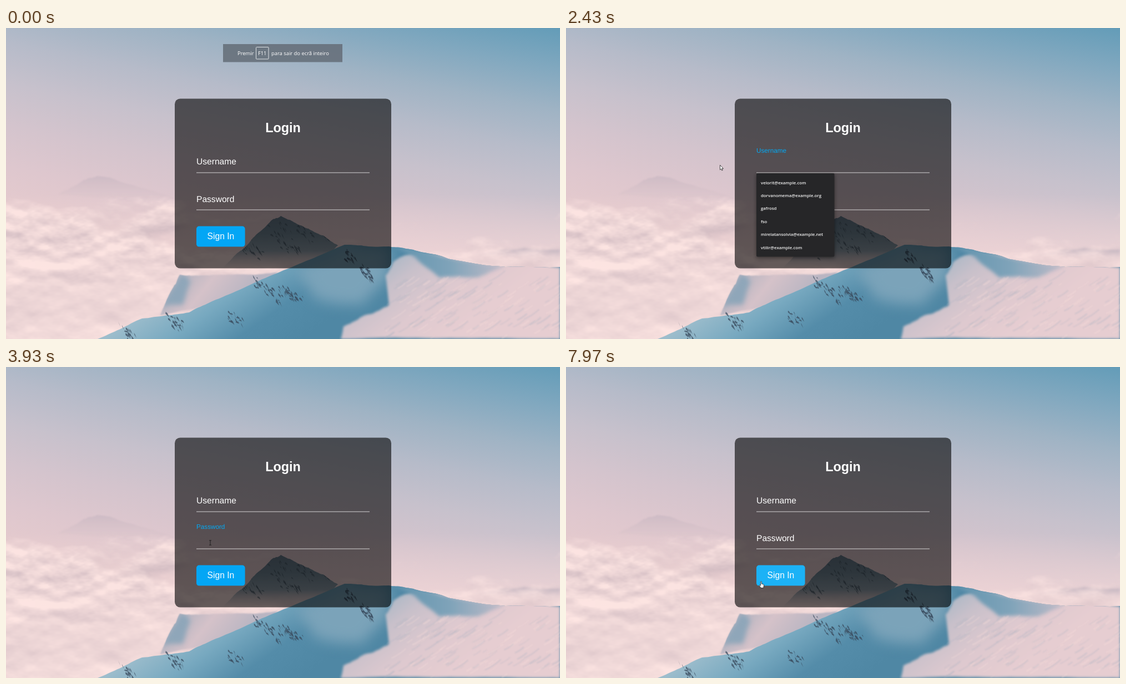
Write an HTML page with a canvas that moves like this. It is 998 px wide and 561 px high and loops after 8000 ms.

```html
<!DOCTYPE html>
<html lang="en">
<head>
<meta charset="utf-8">
<title>Login</title>
<style>
  html, body { margin: 0; width: 100%; height: 100%; overflow: hidden; background: #dcc8ce; }
  canvas, svg { position: absolute; left: 0; top: 0; width: 998px; height: 561px; }
  text { font-family: "Liberation Sans", Arial, sans-serif; font-size: 15.6px; fill: #fff; white-space: pre; }
  #notice text { font-family: "Open Sans", sans-serif; font-size: 9.4px; }
  #list text { font-family: "Open Sans", sans-serif; font-size: 7.8px; font-weight: 600; fill: #f2f2f2; }
  .label { text-rendering: geometricPrecision; }
</style>
</head>
<body>
<canvas id="scene" width="998" height="561"></canvas>
<svg viewBox="0 0 998 561">
  <g id="notice">
    <rect x="391" y="29" width="215" height="32.5" fill="#69737d" opacity=".93"/>
    <rect x="450.5" y="34.5" width="22.5" height="21.5" rx="1" fill="none" stroke="#dfe3e6"/>
    <text x="417" y="48.6">Premir</text>
    <text x="461.7" y="48.6" text-anchor="middle">F11</text>
    <text x="478" y="48.6">para sair do ecrã inteiro</text>
  </g>
  <rect x="304" y="127.5" width="390" height="306" rx="9.75" fill="#000" fill-opacity=".6"/>
  <text x="499" y="187.6" text-anchor="middle" style="font-size:23.4px;font-weight:bold">Login</text>
  <path d="M343 261h312M343 328h312" stroke="#fff" stroke-opacity=".75"/>
  <text id="user" class="label" x="343">Username</text>
  <text id="pass" class="label" x="343">Password</text>
  <g id="dots" fill="#fff"></g>
  <rect id="button" x="343" y="357.6" width="87.6" height="37" rx="4.9"/>
  <text x="362.6" y="381">Sign In</text>
  <g id="list">
    <rect x="343" y="262" width="140.5" height="150.5" rx="2" fill="#262628"
          style="filter:drop-shadow(0 2px 3px rgba(0,0,0,.45))"/>
  </g>
  <rect id="caret" width="1" height="17" fill="#fff"/>
  <g id="cursor" stroke-linejoin="round">
    <path id="arrow" d="M0 0V8.6L2 6.9 3.3 9.8 4.7 9.2 3.4 6.4H6Z" fill="#fff" stroke="#222" stroke-width=".8"/>
    <path id="beam" d="M-2-4.2H2M0-4V4M-2 4.2H2" fill="none" stroke="#1c1a1b" stroke-width=".9"/>
    <path id="hand" d="M-.9.3Q0-.7.9.3V4.2L4.4 5Q5.2 5.4 5 7L4.2 11.5H-.4L-3.2 7.4Q-3.2 6-2 6.4L-.9 7.4Z" fill="#fff" stroke="#222" stroke-width=".8"/>
  </g>
</svg>
<script>
const $ = id => document.getElementById(id);
const clamp = (v, lo = 0, hi = 1) => Math.min(hi, Math.max(lo, v));
const mix = (a, b, k) => a + (b - a) * k;
const smooth = k => k * k * (3 - 2 * k);

/* ---------- landscape, painted once ---------- */
const c = $('scene').getContext('2d');
let seed = 7;
const random = () => (seed = seed * 16807 % 2147483647) / 2147483647;
const jitter = size => (random() - .5) * size;

// evenly spaced colours along a line
function gradient(x0, y0, x1, y1, ...colors) {
  const g = c.createLinearGradient(x0, y0, x1, y1);
  colors.forEach((color, i) => g.addColorStop(i / (colors.length - 1), color));
  return g;
}

// polygon through key points, its edges broken up by midpoint displacement
function crag(outline, rough) {
  let points = outline.split(' ').map(p => p.split(',').map(Number));
  for (; rough > .4; rough /= 2)
    points = points.flatMap((p, i) => {
      const q = points[(i + 1) % points.length];
      return [p, [(p[0] + q[0]) / 2, (p[1] + q[1]) / 2 + jitter(rough)]];
    });
  return new Path2D('M' + points.join('L') + 'Z');
}
function paint(path, fill, blur = 0) {
  c.filter = blur ? `blur(${blur}px)` : 'none';
  c.fillStyle = fill;
  c.fill(path);
}
function inside(path, drawContent) {
  c.save();
  c.clip(path);
  drawContent();
  c.restore();
}
// small slanted slabs of bare rock around a point
function rocks(x, y, spread, count, color) {
  for (let i = 0; i < count; i++) {
    const k = jitter(2), px = x + k * spread + jitter(8), py = y + k * spread * .7 + jitter(18);
    const wide = 1 + 2.5 * random(), tall = 3 + 9 * random();
    paint(new Path2D(`M${px} ${py}l${wide} ${tall * .3} ${tall * .3} ${tall * .7} ${-wide * 2} ${-tall * .6}z`), color, .5);
  }
}

const lattice = Float32Array.from({ length: 4096 }, random);
function noise(x, y) {
  const i = Math.floor(x), j = Math.floor(y), u = smooth(x - i), v = smooth(y - j);
  const at = (a, b) => lattice[(a & 63) + (b & 63) * 64];
  return mix(mix(at(i, j), at(i + 1, j), u), mix(at(i, j + 1), at(i + 1, j + 1), u), v);
}
function fractal(x, y) {
  let sum = 0;
  for (let size = .5, f = 1; f < 32; f *= 2, size /= 2) sum += size * noise(x * f, y * f);
  return sum;
}

function paintClouds() {
  const top = 255, image = c.getImageData(0, top, 998, 561 - top), data = image.data;
  const shade = [205, 184, 191], light = [254, 230, 227];
  for (let i = 0; i < data.length; i += 4) {
    const x = i / 4 % 998, y = top + Math.floor(i / 4 / 998);
    const n = fractal(x / 95, y / 48);
    const edge = mix(285, 385, smooth(clamp(x / 650)));
    const cover = clamp((y - edge) / 45 + 4 * (n - .48)) * mix(.9, .6, x / 998);
    const contrast = mix(3.5, 1.5, clamp((y - 400) / 80));
    const lit = clamp(.66 + contrast * (n - fractal((x + 3) / 95, (y - 11) / 48)));
    for (let k = 0; k < 3; k++) data[i + k] = mix(data[i + k], mix(shade[k], light[k], lit), cover);
  }
  c.putImageData(image, 0, top);
}

function paintScene() {
  c.fillStyle = gradient(998, 0, 883, 577, '#639cb8', '#81a8bf', '#9fb3c4', '#b6bbc9', '#c7c1cc', '#d4c4cd', '#dec7ce', '#e5cacd', '#e7cccf');
  c.fillRect(0, 0, 998, 561);
  c.fillStyle = gradient(0, 300, 0, 500, '#f7dcda00', '#f7dcda');
  c.fillRect(0, 300, 998, 261);

  paint(crag('95,300 130,281 165,267 205,277 300,306 300,318', 6), gradient(0, 265, 0, 316, '#cdbbc5', '#dcc7cc00'), 1);
  paint(crag('850,408 935,397 998,399 998,425', 5), gradient(0, 395, 0, 425, '#b9aebb', '#d8c6cc00'), 2);
  paintClouds();

  const peak = crag('390,433 436,390 478,347 495,339 545,362 598,392 560,433', 7);
  paint(peak, gradient(0, 340, 0, 433, '#66798a', '#718695', '#92a0ac', '#c2b4bc00'), .6);
  inside(peak, () => {
    for (let i = 0; i < 12; i++)
      rocks(mix(430, 575, random()), mix(345, 400, random()), 14, 7, '#42515f90');
  });

  const spur = crag('278,518 300,470 313,445 380,445 490,440 430,490', 6);
  paint(spur, gradient(300, 440, 400, 520, '#a9afbd', '#d5c2c9', '#b9b5c2'), 1);
  inside(spur, () => paint(crag('280,505 315,444 332,456 318,500', 8), '#8fa6b9', 4));

  const ridge = crag('165,561 245,524 330,513 395,483 500,437 610,391 690,394 740,402 800,417 900,431 998,431 998,561', 4);
  paint(ridge, gradient(360, 430, 480, 600, '#9dbdcc', '#78a9c0', '#548ca9', '#4f87a4'), .5);
  inside(ridge, () => {
    paint(crag('520,435 610,391 690,398 690,450 640,500 560,490', 8), '#7ba3b9', 12);

    // sunlit slope, with the shaded band under its crest
    paint(crag('603,561 608,538 650,517 690,500 684,447 700,420 735,407 998,432 998,561', 8),
      gradient(670, 400, 790, 561, '#9db3c3', '#c8c0ca', '#dec9cf', '#e6cdd1'), 2);
    paint(crag('690,393 740,400 800,415 900,429 850,450 780,450 735,412', 4),
      gradient(690, 0, 910, 0, '#5f92ad', '#7fa3b9', '#cabfca'), 3);
    c.filter = 'blur(1px)';
    for (let i = 0; i < 150; i++) {
      const x = mix(680, 1000, random()), y = mix(455, 561, random()), len = 6 + 24 * random();
      c.strokeStyle = i % 2 ? '#f6dddb60' : '#a9b2c250';
      c.lineWidth = 1 + 2 * random();
      c.stroke(new Path2D(`M${x} ${y}q${len * .5} ${-len * .2} ${len} ${-len * .65}`));
    }
  });

  for (const [x, y, spread, count] of [
    [218, 548, 14, 18], [304, 528, 14, 24], [411, 522, 14, 18], [470, 470, 24, 34],
    [512, 478, 20, 34], [617, 412, 9, 18], [648, 438, 12, 34]])
    rocks(x, y, spread, count, '#3a4c5ec0');
}
paintScene();

/* ---------- form ---------- */
function add(parent, tag, attributes, text = '') {
  const node = document.createElementNS('http://www.w3.org/2000/svg', tag);
  for (const key in attributes) node.setAttribute(key, attributes[key]);
  node.textContent = text;
  $(parent).append(node);
}
['velorit@example.com', 'dorvanomema@example.org', 'gafrosd', 'fso', 'mirelatansolvia@example.net', 'vtilir@example.com']
  .forEach((entry, i) => add('list', 'text', { x: 351, y: 281.6 + 23.4 * i }, entry));
for (let i = 0; i < 7; i++) add('dots', 'circle', { cx: 346 + 6.35 * i, cy: 308.6, r: 2.2 });

const LOOP = 8000, USER = [1600, 2600], PASS = [3430, 6940];
const TYPE = 4100, ERASE = 5500;
const blinkStarts = [USER[0], PASS[0], TYPE, TYPE + 400, ERASE, ERASE + 70];
const stops = [
  { x: 388, y: 566, leave: 700 },
  { x: 370, y: 248, arrive: 1430, leave: 2200 },
  { x: 252, y: 247, arrive: 2530, leave: 2930 },
  { x: 368, y: 317, arrive: 3230, leave: 6030 },
  { x: 183, y: 304.5, arrive: 6170, leave: 7570 },
  { x: 351.5, y: 387, arrive: 7930 }];

// CSS "ease" timing curve
function ease(x) {
  let lo = 0, hi = 1;
  const bezier = (s, a, b) => 3 * (1 - s) ** 2 * s * a + 3 * (1 - s) * s * s * b + s ** 3;
  for (let i = 0; i < 20; i++) {
    const mid = (lo + hi) / 2;
    if (bezier(mid, .25, .25) < x) lo = mid; else hi = mid;
  }
  return bezier(lo, .1, 1);
}
const within = (t, [start, end]) => t >= start && t < end;
const show = (node, on) => node.setAttribute('visibility', on ? 'visible' : 'hidden');

function drawLabel(id, baseline, t, [focus, blur]) {
  const up = t < blur ? ease(clamp((t - focus) / 500)) : 1 - ease(clamp((t - blur) / 500));
  const label = $(id);
  label.setAttribute('y', baseline - 21.4 * up);
  label.style.fontSize = mix(15.6, 11.7, up) + 'px';
  label.style.fill = `rgb(${mix(255, 3, up)},${mix(255, 169, up)},${mix(255, 244, up)})`;
}

function drawCursor(t) {
  let { x, y } = stops[0];
  for (let i = 1; i < stops.length; i++) {
    const { leave } = stops[i - 1], k = smooth(clamp((t - leave) / (stops[i].arrive - leave)));
    x = mix(x, stops[i].x, k);
    y = mix(y, stops[i].y, k);
  }
  const over = (top, bottom, right) => x >= 343 && x <= right && y >= top && y <= bottom;
  const onButton = over(357.6, 394.6, 430.6);
  const onInput = over(222, 261, 655) || over(289, 328, 655);
  $('cursor').setAttribute('transform', `translate(${x} ${y})`);
  show($('hand'), onButton);
  show($('beam'), onInput);
  show($('arrow'), !onButton && !onInput);
  $('button').setAttribute('fill', onButton ? '#1cb2f6' : '#03a6f5');
}

function draw(t) {
  $('notice').setAttribute('opacity', clamp((530 - t) / 500));
  drawLabel('user', 246.2, t, USER);
  drawLabel('pass', 313.6, t, PASS);
  show($('list'), within(t, [1700, USER[1]]));

  const keys = (start, gap) => clamp(Math.floor((t - start) / gap) + 1, 0, 7);
  const count = keys(TYPE, 67) - keys(ERASE, 33);
  [...$('dots').children].forEach((dot, i) => show(dot, i < count));

  const onUser = within(t, USER), onPass = within(t, PASS);
  const blink = t - blinkStarts.filter(s => s <= t).pop();
  $('caret').setAttribute('x', onPass ? 343 + 6.6 * count : 343);
  $('caret').setAttribute('y', onPass ? 300.5 : 233);
  show($('caret'), (onUser || onPass) && blink % 1000 < 500);
  drawCursor(t);
}

const start = performance.now();
function frame() {
  draw((performance.now() - start) % LOOP);
  requestAnimationFrame(frame);
}
frame();
</script>
</body>
</html>
```
